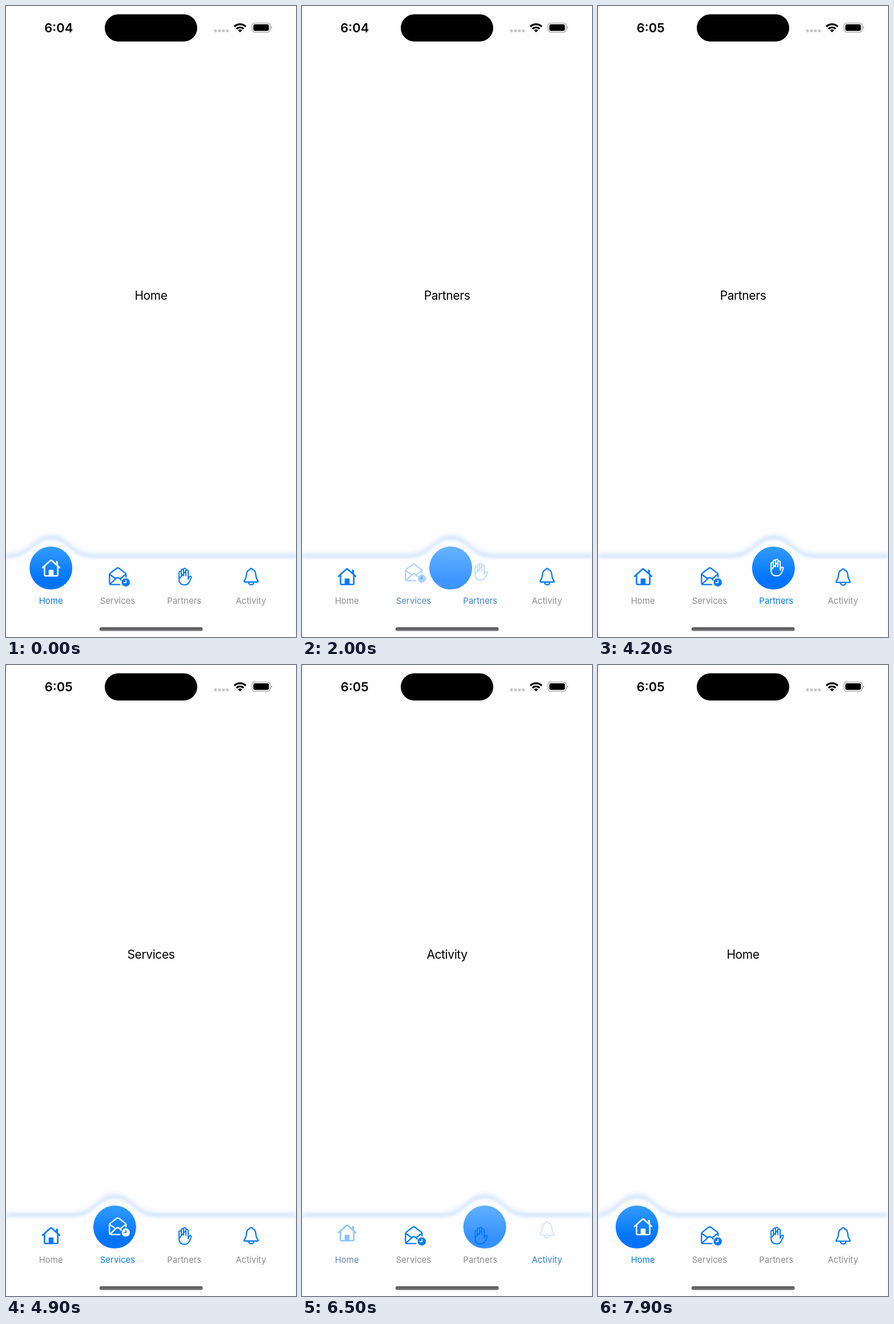
Animation of 508 by 1102 pixels, one loop 8000 ms. Source, as an HTML page:

```html
<!DOCTYPE html>
<html lang="en">
<head>
<meta charset="utf-8">
<title>Curved tab bar</title>
<style>
  html, body { margin: 0; width: 100%; height: 100%; overflow: hidden; background: #fefdff; }
  svg { display: block; width: 100%; height: 100%; }
  text { font-family: Inter, Roboto, sans-serif; text-anchor: middle; }
  #title { font-size: 21px; letter-spacing: -.4px; }
  #clock { font-size: 22px; font-weight: 600; }
  .label { font-size: 15px; }
  .icon { fill: none; stroke: currentColor; stroke-width: 2.3; stroke-linecap: round; stroke-linejoin: round; }
  .icon .solid { fill: currentColor; stroke: none; }
  .icon .hands { stroke: var(--inverse); stroke-width: 1.8; }
</style>
</head>
<body>
<svg viewBox="0 0 508 1102">
  <defs>
    <linearGradient id="ball" x2="0" y2="1">
      <stop stop-color="#349cff"/>
      <stop offset=".75" stop-color="#0074ff"/>
    </linearGradient>
    <linearGradient id="grip" x2="0" y2="1">
      <stop stop-color="#555457"/>
      <stop offset="1" stop-color="#77767a"/>
    </linearGradient>
    <filter id="glow" filterUnits="userSpaceOnUse" x="-40" y="880" width="588" height="300" color-interpolation-filters="sRGB">
      <feDropShadow dx="0" dy="-6.5" stdDeviation="3.3" flood-color="#007aff" flood-opacity=".2"/>
      <feGaussianBlur stdDeviation="2.6"/>
    </filter>
  </defs>

  <!-- status bar -->
  <text id="clock" x="92.3" y="46"></text>
  <rect x="173" y="14.5" width="162" height="47.5" rx="23.75"/>
  <g fill="#c8c7cb">
    <rect x="364.5" y="41" width="4.8" height="4.8" rx="1.2"/>
    <rect x="371.5" y="41" width="4.8" height="4.8" rx="1.2"/>
    <rect x="378.5" y="41" width="4.8" height="4.8" rx="1.2"/>
    <rect x="385.3" y="41" width="4.8" height="4.8" rx="1.2"/>
  </g>
  <g fill="none" stroke="#000" stroke-width="3.3">
    <path d="M400 36a14.3 14.3 0 0 1 20 0M403.7 39.9a9 9 0 0 1 12.6 0"/>
    <path d="M410 46l-3.5-3.6a5 5 0 0 1 7 0z" fill="#000" stroke="none"/>
  </g>
  <rect x="431" y="29.8" width="31.8" height="16" rx="4.8" fill="none" stroke="#a09fa3" stroke-width="1.3"/>
  <rect x="433.3" y="32" width="27.2" height="11.6" rx="3"/>
  <path d="M464.3 35.3q1.8.8 1.8 2.5t-1.8 2.5z" fill="#a09fa3"/>

  <text id="title" x="254" y="513.3"></text>
  <path id="bar" fill="#fefdff" filter="url(#glow)"/>
  <g id="tabs"></g>
  <rect x="163.8" y="1085" width="180.8" height="6.4" rx="3.2" fill="url(#grip)"/>
</svg>

<script>
const BLUE = [0, 122, 255], GREY = [142, 142, 147], WHITE = [255, 255, 255];
const LOOP = 8000, MINUTE_TICK = 2350, BAR_TOP = 964;

const TABS = [
  ['Home', `<path stroke-width="2.6" d="M-15-.5L-1.4-12.8q1.4-1.2 2.8 0L15-.5M-11.5-3V11.7q0 2 2 2H9.7q2 0 2-2V-3"/>
    <path class="solid" d="M-4.3 14V4.2q0-1 1-1h6.6q1 0 1 1V14zM8.7-7v-4q0-1 1-1h1.400q1 0 1 1v7z"/>`],
  ['Services', `<path d="M3.500 13.800H-12q-2.500 0-2.500-2.500V-3.500q0-1.400 1.200-2.300L-2-14.500q2-1.500 4 0L13.300-5.800q1.200.9 1.200 2.300V.5M-14-3.800L-4 3.500M14-3.800L4.500 3.500M-13.500 13L-2.200 2.600q2.200-1.700 4.400 0L6 6"/>
    <circle class="solid" cx="14" cy="10.200" r="7.200"/><path class="hands" d="M14.400 6.500v4h-3.200"/>`],
  ['Partners', `<path stroke-width="2" d="M-9.500 4V-7a2 2 0 0 1 4 0V0M-5.500-2V-11a2 2 0 0 1 4 0V-1.500M-1.500-10V-12.500a2 2 0 0 1 4 0V-1.500M2.500-9.500a2 2 0 0 1 4 0V4.500L8.300.7Q9.400-1.300 10.900-.6T11.700 2.200L8.800 9Q6.200 14.500.3 14.500-9.500 14.500-9.500 4z"/>`],
  ['Activity', `<path d="M-11 9.500q-1.900-.1-1-2C-9.800 4-8.500 3-8.200-3-8-8-6-11-2.700-12a2.800 2.800 0 0 1 5.400 0C6-11 8-8 8.200-3 8.500 3 9.800 4 12 7.500q.9 1.900-1 2zM-4.600 10a4.600 4.200 0 0 0 9.200 0"/>`]
];

// [time of tap, tab index]
const TAPS = [[-2000, 0], [455, 1], [1852, 2], [2900, 3], [3740, 2], [4510, 1], [5300, 0], [6320, 3], [7375, 0]];

const $ = id => document.getElementById(id);
const tabX = i => 78.700 + 116.800 * i;
const mix = (a, b, k) => `rgb(${a.map((v, i) => v + (b[i] - v) * k)})`;
const clamp = v => Math.min(1, Math.max(0, v));

// Unit spring: response 0.6 s, damping fraction 0.7
function spring(t) {
  const w = 2 * Math.PI / .6, z = .7, s = Math.sqrt(1 - z * z), a = w * s * t;
  return 1 - Math.exp(-z * w * t) * (Math.cos(a) + z / s * Math.sin(a));
}

// Visible tint of an icon while it cross-fades
const tint = w => w * (.55 + .45 * w ** 4);

$('tabs').innerHTML = TABS.map(([name, art], i) =>
  `<circle cy="981.5" r="37.500" fill="url(#ball)"/><g class="icon">${art}</g>
   <text class="label" x="${tabX(i)}" y="1044">${name}</text>`).join('');
const balls = document.querySelectorAll('#tabs > circle');
const icons = document.querySelectorAll('.icon');
const labels = document.querySelectorAll('.label');

function drawBar(x) {
  const y = BAR_TOP, top = y - 32.3;
  $('bar').setAttribute('d', `M0 ${y}H${x - 77.6}C${x - 32.3} ${y} ${x - 32.3} ${top} ${x} ${top}` +
    `S${x + 32.3} ${y} ${x + 77.6} ${y}H508V1130H0z`);
}

function draw(t) {
  const n = TAPS.findLastIndex(tap => tap[0] <= t);
  const [start, to] = TAPS[n];
  const from = n ? TAPS[n - 1][1] : to;
  const p = spring((t - start) / 1000);
  const x = tabX(from) + (tabX(to) - tabX(from)) * p;

  $('clock').textContent = t < MINUTE_TICK ? '6:04' : '6:05';
  $('title').textContent = TABS[to][0];
  drawBar(x);

  TABS.forEach((_, i) => {
    const lift = i === to ? p : i === from ? 1 - p : 0;
    const on = clamp(lift), k = tint(1 - on);
    balls[i].setAttribute('cx', x);
    balls[i].setAttribute('opacity', on);
    icons[i].setAttribute('transform', `translate(${tabX(i) + .3} ${996.5 - 15 * lift})`);
    icons[i].style.color = mix(WHITE, BLUE, k);
    icons[i].style.setProperty('--inverse', mix(BLUE, WHITE, k));
    labels[i].style.fill = mix(GREY, BLUE, on);
  });
}

const begin = performance.now();
function tick() {
  draw((performance.now() - begin) % LOOP);
  requestAnimationFrame(tick);
}
tick();
</script>
</body>
</html>
```
